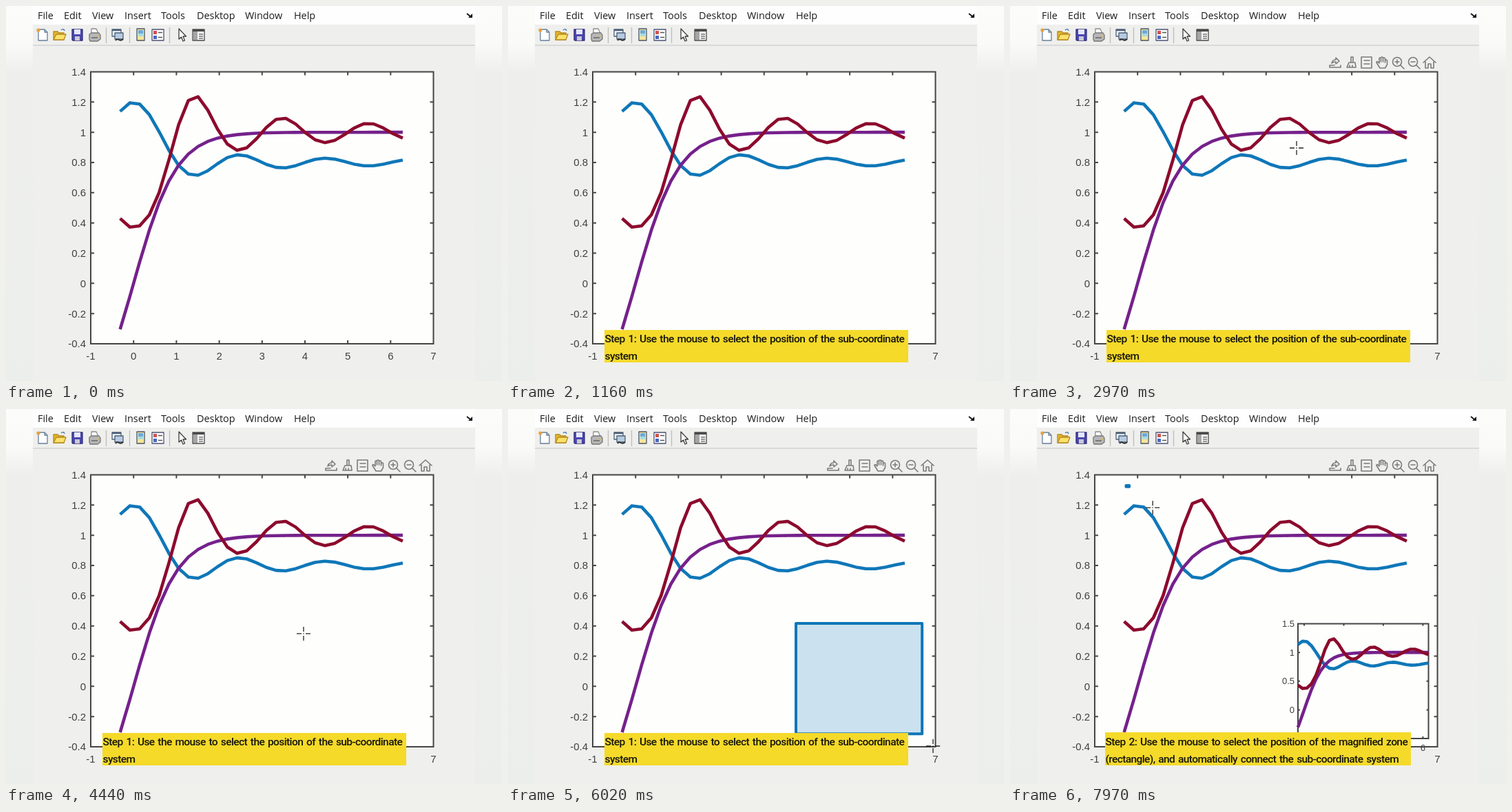
An HTML page that plays this animation: 720x544 px, repeating every 8000 ms.

```html
<!DOCTYPE html>
<html lang="en">
<head>
<meta charset="utf-8">
<title>Sub-coordinate plot</title>
<style>
  html, body { margin: 0; width: 100%; height: 100%; overflow: hidden; background: #eeefed; }
  svg { display: block; width: 720px; height: 544px; }
  .menu { font: 14.4px "Open Sans", "Noto Sans", sans-serif; fill: #1c1c1c; }
  .label { font-family: "Liberation Sans", sans-serif; fill: #404040; }
  .curve { fill: none; stroke-linejoin: round; }
  .axis { fill: none; stroke: #454545; stroke-width: 2; }
  .select { fill: #0f77b8; fill-opacity: .21; stroke: #0f77b8; stroke-width: 4; stroke-linejoin: round; }
  .note { font-family: "Roboto", "Open Sans", sans-serif; font-stretch: condensed; font-weight: 500; letter-spacing: -.04em; word-spacing: .1em; fill: #17160c; }
  .tools { fill: none; stroke: #7b7b7b; stroke-width: 1.6; stroke-linejoin: round; stroke-linecap: round; }
</style>
</head>
<body>
<svg viewBox="0 0 720 544">
  <defs>
    <linearGradient id="side" x2="0" y2="1">
      <stop offset="0" stop-color="#fcfcfb"/>
      <stop offset=".1" stop-color="#fafaf9"/>
      <stop offset=".18" stop-color="#eeefed"/>
      <stop offset="1" stop-color="#eceeeb"/>
    </linearGradient>
  </defs>
  <rect width="720" height="544" fill="url(#side)"/>
  <rect x="39" width="642" height="544" fill="#efefed"/>
  <rect x="39" width="642" height="27" fill="#fefefe"/>
  <path d="M39 57H681" stroke="#c4c4c4"/>
  <g id="menu" class="menu"></g>
  <path d="M669 11l5 4" stroke="#111" stroke-width="1.8"/><path d="M677 11v6h-6z" fill="#111"/>

  <g id="toolbar" stroke-width="1.3" stroke-linejoin="round">
    <path d="M145.5 31v23M179.5 31v23M237.5 31v23" stroke="#bdbdbd"/>
    <path d="M47 34h9l4 4v12h-13z" fill="#fff" stroke="#657f9a"/>
    <path d="M56 34v4h4" fill="none" stroke="#657f9a"/>
    <circle cx="47" cy="35" r="2.6" fill="#e9a13b"/>
    <path d="M69 49V37h6l2 2h7v10z" fill="#e3b52d" stroke="#b58b20"/>
    <path d="M69 49l4-8h14l-3 8z" fill="#fbe06a" stroke="#b58b20"/>
    <path d="M80 35q4-3 5 1" fill="none" stroke="#4a78a8"/>
    <path d="M96 34h15v16h-14l-1-1z" fill="#4b46b0" stroke="#302d78"/>
    <path d="M99 34h9v7h-9z" fill="#e5e7fa"/><path d="M100 44h7v6h-7z" fill="#c9c9d6"/>
    <path d="M124 40v-7h7l3 7" fill="#fff" stroke="#8c8c8c"/>
    <path d="M121 41l3-2h11l2 3v6l-4 3h-11l-1-3z" fill="#b7b7b7" stroke="#777"/>
    <path d="M124 46h9" stroke="#5c5c5c"/><circle cx="134" cy="44" r="1.1" fill="#d8b93c"/>
    <path d="M154 34h13v10h-13z" fill="#eef4fa" stroke="#4e6075"/><path d="M154 35h13" stroke="#4e6075" stroke-width="2.4"/>
    <path d="M158 39h12v9h-12z" fill="#b6cbe1" stroke="#4e6075"/>
    <path d="M159 50q2-3 5-1t6-1" fill="none" stroke="#333" stroke-width="2"/>
    <path d="M190 33h11v17h-11z" fill="#f6e59c" stroke="#4c5662"/>
    <path d="M192 35h7v5h-7z" fill="#6da9df"/><path d="M192 40h7v4h-7z" fill="#a6dbe4"/>
    <path d="M212 34h17v16h-17z" fill="#fff" stroke="#4c5275"/>
    <path d="M214 36h5v5h-5z" fill="#d3524c"/><path d="M214 43h5v5h-5z" fill="#4a67c1"/>
    <path d="M221 38.5h6M221 45.5h6" stroke="#555"/>
    <path d="M251 33v15l3.5-3 2.5 6 2.5-1-2.5-6h4.5z" fill="#fff" stroke="#3c3c3c"/>
    <path d="M271 34h17v16h-17z" fill="#f7f7f7" stroke="#4a4a4a"/>
    <path d="M271 35.5h17" stroke="#4a4a4a" stroke-width="3"/><path d="M272 37h6v12h-6z" fill="#a5a5a5"/>
    <path d="M280 41h6M280 44h6M280 47h6" stroke="#777"/>
  </g>

  <g id="main"></g>

  <g id="tools" class="tools">
    <path d="M464 89h16v-3M464 89v-3h7M467 83q1-5 6-5v-3l5 5-5 4v-3q-4 0-6 2"/>
    <path d="M495 74h3v8h-3zM492 82h9l1 7h-13zM493 86v3M497 86v3"/>
    <path d="M510 74h15v16h-15zM514 79h8M514 84h8"/>
    <path d="M537 90l-5-8q0-2 2-1l2 2v-7q1-2 2.5 0v5v-6q1.5-2 3 0v6v-5q1.5-2 3 0v6v-3q2-2 3 0v6l-3 5z"/>
    <circle cx="562" cy="81" r="6.5"/><path d="M567 86l5 5M559 81h6M562 78v6"/>
    <circle cx="585" cy="81" r="6.5"/><path d="M590 86l5 5M582 81h6"/>
    <path d="M600 82l9-8 9 8M603 81v9h4v-6h4v6h4v-9"/>
  </g>

  <g id="inset"></g>
  <rect id="areaA" class="select"/>
  <rect id="areaB" class="select"/>
  <path id="cursor" d="M-10 0h7M3 0h7M0-10v7M0 3v7M-.7 0h1.4" stroke="#222" stroke-width="1.3"/>
  <g id="noteA"></g>
  <g id="noteB"></g>
</svg>

<script>
const LOOP = 8000;
const $ = id => document.getElementById(id);
const text = (x, y, s, anchor = 'start', size = '') =>
  `<text x="${x}" y="${y}" text-anchor="${anchor}"${size && ` font-size="${size}"`}>${s}</text>`;

$('menu').innerHTML = [['File', 46], ['Edit', 84], ['View', 125], ['Insert', 172], ['Tools', 225],
  ['Desktop', 277], ['Window', 347], ['Help', 418]].map(([s, x]) => text(x, 18.5, s)).join('');

const sinc = x => x ? Math.sin(Math.PI * x) / (Math.PI * x) : 1;
const START = -Math.PI / 10, END = 2 * Math.PI;
const samples = Array.from({ length: 30 }, (_, i) => START + (END - START) * i / 29);
const curves = [
  ['#0f77b8', x => 0.8 + 0.4 * sinc(x)],
  ['#75218b', Math.tanh],
  ['#8c0a2d', x => Math.exp(-sinc(x))]
];

function plot(id, { left, top, right, bottom, xLim, yLim, xTicks, yTicks, tick, size, gap, drop, width }) {
  const px = x => left + (x - xLim[0]) / (xLim[1] - xLim[0]) * (right - left);
  const py = y => bottom - (y - yLim[0]) / (yLim[1] - yLim[0]) * (bottom - top);
  let ticks = '', labels = '';
  for (const x of xTicks) {
    ticks += `M${px(x)} ${top}v${tick}M${px(x)} ${bottom}v${-tick}`;
    labels += text(px(x), bottom + drop, x, 'middle', size);
  }
  for (const y of yTicks) {
    ticks += `M${left} ${py(y)}h${tick}M${right} ${py(y)}h${-tick}`;
    labels += text(left - gap, py(y) + size * 0.36, y, 'end', size);
  }
  const lines = curves.map(([color, f]) =>
    `<polyline class="curve" stroke="${color}" stroke-width="${width}" points="${samples.map(x => px(x) + ',' + py(f(x))).join(' ')}"/>`);
  $(id).innerHTML = `<rect x="${left}" y="${top}" width="${right - left}" height="${bottom - top}" fill="#fefefd"/>
    <path class="axis" d="M${left} ${top}H${right}V${bottom}H${left}Z${ticks}"/>
    <g class="label">${labels}</g>${lines.join('')}`;
}

plot('main', {
  left: 123, top: 95.5, right: 620.5, bottom: 490, xLim: [-1, 7], yLim: [-0.4, 1.4],
  xTicks: [-1, 0, 1, 2, 3, 4, 5, 6, 7], yTicks: [-0.4, -0.2, 0, 0.2, 0.4, 0.6, 0.8, 1, 1.2, 1.4],
  tick: 5, size: 15, gap: 7, drop: 22.5, width: 4.6
});
plot('inset', {
  left: 418, top: 311.5, right: 607.5, bottom: 478, xLim: [START, END], yLim: [-0.5, 1.5],
  xTicks: [0, 2, 4, 6], yTicks: [0, 0.5, 1, 1.5],
  tick: 3, size: 13, gap: 5, drop: 17.5, width: 4.6
});

// The font size follows from the measured length of the longest line.
function note(id, x, y, width, textWidth, lines) {
  const box = $(id);
  box.innerHTML = `<rect x="${x}" y="${y}" width="${width}" height="${517 - y}" fill="#f5da2a"/>
    <g class="note" font-size="100">${lines.map((s, i) => text(x + 0.5, 487.5 + 25.5 * i, s)).join('')}</g>`;
  const longest = Math.max(...[...box.querySelectorAll('text')].map(t => t.getComputedTextLength()));
  box.querySelector('.note').setAttribute('font-size', 100 * textWidth / longest);
}
note('noteA', 140, 470, 441, 435,
  ['Step 1: Use the mouse to select the position of the sub-coordinate', 'system']);
note('noteB', 138, 469, 444, 439,
  ['Step 2: Use the mouse to select the position of the magnified zone',
   '(rectangle), and automatically connect the sub-coordinate system']);

// Time, x, y of the pointer
const path = [
  [1850, 400, 528], [2350, 408, 330], [2970, 416, 206], [3250, 417, 212], [4440, 432, 326],
  [4850, 418, 311], [5150, 418, 311], [5820, 601, 471], [5950, 617, 489], [6450, 617, 489],
  [7080, 225, 185], [7500, 168.5, 111], [7700, 168.5, 111], [7770, 173, 112.5], [7970, 207, 143], [8000, 212, 147]
];
const LAG = 200;

function pointer(t) {
  const i = Math.max(1, path.findIndex(p => p[0] >= t));
  const [t0, x0, y0] = path[i - 1], [t1, x1, y1] = path[i];
  const k = Math.max(0, (t - t0) / (t1 - t0));
  return [x0 + (x1 - x0) * k, y0 + (y1 - y0) * k];
}

const show = (id, on) => $(id).style.display = on ? '' : 'none';

function drag(id, t, from, to, x, y, maxX, maxY) {
  show(id, t >= from && t < to);
  const [cx, cy] = pointer(t - LAG);
  const size = { x, y, width: Math.max(0, Math.min(cx, maxX) - x), height: Math.max(0, Math.min(cy, maxY) - y) };
  for (const key in size) $(id).setAttribute(key, size[key]);
}

function draw(t) {
  show('noteA', t >= 380 && t < 7400);
  show('noteB', t >= 7400);
  show('tools', t >= 2050);
  show('inset', t >= 6400);
  show('cursor', t >= 1850);
  $('cursor').setAttribute('transform', `translate(${pointer(t)})`);
  drag('areaA', t, 5360, 6400, 418, 311, 608, 478);
  drag('areaB', t, 7910, LOOP, 168.5, 111, 620, 490);
}

const begin = performance.now();
function frame() {
  draw((performance.now() - begin) % LOOP);
  requestAnimationFrame(frame);
}
frame();
</script>
</body>
</html>
```
